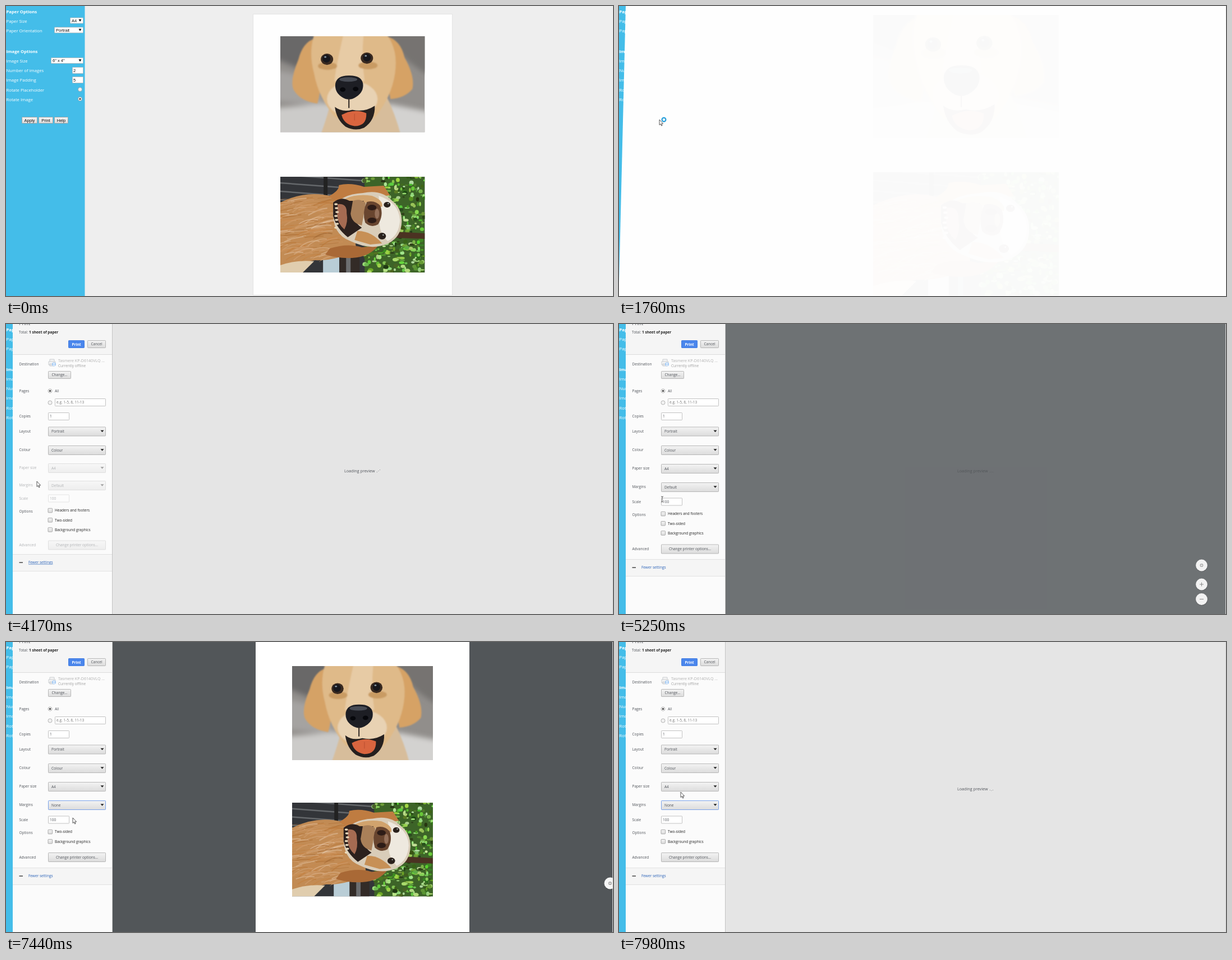
Write an HTML page that moves like this. It is 1082x518 px and loops after 8000 ms.

```html
<!DOCTYPE html>
<html lang="en">
<head>
<meta charset="utf-8">
<title>Print preview</title>
<style>
  html, body { margin: 0; width: 100%; height: 100%; overflow: hidden; background: #eee; }
  svg { display: block; }
  #stage { width: 100vw; height: 100vh; }
  text { white-space: pre; }
  .side { font: 7.7px "Open Sans", "Noto Sans", sans-serif; fill: #fff; }
  .form { font: 7.5px "Liberation Sans", Arial, sans-serif; fill: #111; }
  .ui { font: 6.5px "Open Sans", "Noto Sans", sans-serif; fill: #50545a; }
  .bold { font-weight: 700; }
  .mid { text-anchor: middle; }
</style>
</head>
<body>
<svg id="stage" viewBox="0 0 1082 518" preserveAspectRatio="none">
  <defs>
    <linearGradient id="face" x2="0" y2="1"><stop stop-color="#f3f3f3"/><stop offset="1" stop-color="#dcdcdc"/></linearGradient>
    <filter id="soft"><feGaussianBlur stdDeviation="5"/></filter>
    <filter id="fuzz"><feGaussianBlur stdDeviation="1.3"/></filter>
    <symbol id="puppy" viewBox="0 0 257 171" preserveAspectRatio="none"></symbol>
    <symbol id="retriever" viewBox="0 0 257 171" preserveAspectRatio="none"></symbol>
  </defs>
  <g id="page"></g>
  <g id="sheet">
    <path d="M12 0 0 495V518H1082V56L1081 0Z" fill="#fefefe"/>
    <g opacity=".025">
      <use href="#puppy" x="453" y="16" width="331" height="220"/>
      <use href="#retriever" x="453" y="297" width="331" height="220"/>
    </g>
  </g>
  <g id="dialog">
    <rect x="189" width="892" height="518" fill="#525659"/>
    <g id="paper">
      <rect x="445" width="381" height="518" fill="#fff"/>
      <use href="#puppy" x="510" y="43" width="251" height="168"/>
      <use href="#retriever" x="510" y="287" width="251" height="167.5"/>
    </g>
    <g id="zoom"></g>
    <g id="overlay">
      <rect x="189" width="892" height="518" fill="#e5e5e5"/>
      <g class="ui" style="font-size:7.2px" fill="#444"><text x="603" y="265">Loading preview</text><g id="dots"></g></g>
    </g>
    <rect x="1081" width="1" height="518" fill="#d4d4d4"/>
    <g id="panel"></g>
    <g id="menu"></g>
  </g>
  <g id="cursor" stroke="#222" stroke-width=".75">
    <path id="arrow" d="M0 0V9.5L2.2 7.6 3.7 11 5.1 10.4 3.7 7.1H6.6Z" fill="#fff"/>
    <path id="beam" d="M-2-5Q0-5 0-4Q0-5 2-5M0-4V4M-2 5Q0 5 0 4Q0 5 2 5" fill="none"/>
    <circle id="busy" cx="8" cy="0" r="3.4" fill="#fff" stroke="#2aa0da" stroke-width="2.2"/>
  </g>
</svg>
<script>
const LOOP = 8000;
const $ = id => document.getElementById(id);
const clamp = v => Math.max(0, Math.min(1, v));
const smooth = v => (v = clamp(v), v * v * (3 - 2 * v));
const show = (id, on) => $(id).style.display = on ? '' : 'none';

let seed = 7;
const rnd = (a, b) => a + (b - a) * ((seed = seed * 16807 % 2147483647) / 2147483647);
const many = (n, make) => Array.from({ length: n }, (_, i) => make(i)).join('');

// Markup helpers
const text = (x, y, s, attrs = '') => `<text x="${x}" y="${y}" ${attrs}>${s}</text>`;
const rect = (x, y, w, h, fill, attrs = '') => `<rect x="${x}" y="${y}" width="${w}" height="${h}" fill="${fill}" ${attrs}/>`;
const path = (d, fill, attrs = '') => `<path d="${d}" fill="${fill}" ${attrs}/>`;
const oval = (x, y, rx, ry, fill, attrs = '') => `<ellipse cx="${x}" cy="${y}" rx="${rx}" ry="${ry}" fill="${fill}" ${attrs}/>`;
const box = (x, y, w, h, fill = '#fff', line = '#b4b4b4') =>
  rect(x + .5, y + .5, w - 1, h - 1, fill, `stroke="${line}" stroke-width=".8" rx=".8"`);
const radio = (x, y, on) => oval(x, y, 3.5, 3.5, '#f2f2f2', 'stroke="#999" stroke-width=".7"') + (on ? oval(x, y, 1.6, 1.6, '#333') : '');

function drawPuppy() {
  return rect(0, 0, 257, 171, '#918e8b') + `<g filter="url(#soft)">` +
    path('M-9-9H70L40 60-9 40Z', '#696867') + path('M185-9H266V70Q225 50 185 0Z', '#767371') +
    path('M-9 60 60 75 80 125-9 115Z', '#a5a3a1') + path('M-9 128 100 118 110 180H-9Z', '#cccbc9') +
    path('M190 120 266 135V180H190Z', '#d3d2d0') + '</g><g filter="url(#fuzz)">' +
    path('M72 175Q88 130 92 105H188Q205 140 214 175Z', '#d7bd9b') +
    path('M62 4Q40 10 32 42 16 80 24 96 36 116 66 120 80 70 62 4Z', '#d5a266') +
    path('M188 0Q214 6 221 38 240 72 235 94 222 110 196 112 184 60 188 0Z', '#d6a265') +
    path('M60-2Q50 30 60 66 68 110 98 145H168Q198 108 204 66 210 25 190-2Z', '#dfba89') +
    path('M112-2Q100 50 96 80H150Q144 40 148-2Z', '#e7cba5') +
    oval(128, 112, 45, 32, '#e8d2b3') + oval(84, 53, 17, 7, '#c99b63') + oval(156, 52, 17, 7, '#c99b63') + '</g>' +
    oval(83, 41, 11, 10, '#3a2a20') + oval(154, 39, 11, 10, '#3a2a20') +
    oval(82, 40, 7, 7, '#17171c') + oval(154, 38, 7, 7, '#17171c') +
    oval(80, 37, 2, 1.5, '#8998a4') + oval(152, 35, 2, 1.5, '#8998a4') +
    path('M97 126Q110 136 128 131 150 136 168 124 169 150 149 163 133 170 116 161 100 149 97 126Z', '#25201f') +
    path('M109 140Q132 128 153 137 154 160 132 160 113 157 109 140Z', '#d9653f') + path('M132 138V150', 'none', 'stroke="#b94d32"') +
    path('M98 84Q101 70 121 70 144 69 147 84 149 99 135 108 122 117 109 108 96 99 98 84Z', '#1d1e24') +
    oval(121, 77, 16, 4, '#484c55') + path('M122 110V128', 'none', 'stroke="#2a2420" stroke-width="2"') +
    oval(111, 95, 5, 4, '#07080c') + oval(134, 94, 5, 4, '#07080c');
}

function drawRetriever() {
  const leaf = () => oval(rnd(148, 257).toFixed(1), rnd(0, 171).toFixed(1), rnd(1.5, 5).toFixed(1), rnd(1, 4).toFixed(1),
    `hsl(${rnd(82, 108).toFixed()} ${rnd(40, 65).toFixed()}% ${rnd(14, 76).toFixed()}%)`);
  const hair = () => {
    const x = rnd(12, 112), y = rnd(36, 142);
    return path(`M${x} ${y}q-16 ${rnd(-5, 3)}-34 ${rnd(2, 13)}`, 'none',
      `stroke="hsl(29 53% ${rnd(40, 78).toFixed()}%)" stroke-width="${rnd(.8, 2.4).toFixed(1)}" opacity=".6"`);
  };
  return rect(0, 0, 257, 171, '#333539') +
    many(5, i => path(`M0 ${i * 15 - 4}L160 ${i * 15 + 8}`, 'none', 'stroke="#65686b" stroke-width="2.5"')) +
    rect(77, 0, 7, 35, '#222') + rect(150, 0, 107, 171, '#3d6428') + many(380, leaf) +
    rect(76, 138, 29, 33, '#b9cdd6') + rect(105, 135, 36, 36, '#332b27') + rect(117, 135, 8, 36, '#6d6e70') +
    path('M202 98 257 101V111L202 109Z', '#4b3222') +
    path('M0 46Q45 23 92 35L125 38 135 130Q100 151 62 149 35 154 0 171Z', '#c28b54') + many(150, hair) +
    path('M0 158Q28 148 60 151L40 171H0Z', '#e0cdae') +
    path('M86 35Q106 24 104 15 125 10 149 18L184 16 195 33 160 38 105 47Z', '#bf7c41') +
    path('M88 128Q120 118 145 126L174 123Q159 143 128 145 101 146 80 139Z', '#a96936') +
    path('M94 57Q106 31 147 29 180 22 199 43 216 56 216 80 215 108 192 119 162 133 125 115 91 103 94 57Z', '#d9cdb9') +
    path('M175 34Q211 46 213 78 211 105 191 115 171 95 178 66Z', '#eee9df') +
    path('M116 39Q136 30 163 34 184 42 181 54L147 45 112 49Z', '#d1a36d') +
    path('M137 97Q161 96 181 119L160 121 132 113Z', '#c79056') +
    path('M94 46Q108 34 123 43L149 43Q133 53 132 67 130 81 145 91L120 108Q99 91 94 70Z', '#2c211e') +
    path('M102 49Q119 47 118 65 121 81 114 94 102 84 101 68Z', '#a56b52') +
    many(7, i => oval(99 + i % 3, 49 + i * 7, 3, 1.8, '#e8d9bb')) +
    path('M129 43Q142 38 152 47L145 87Q127 83 125 66Z', '#a98059') +
    path('M154 45Q168 41 178 52 184 69 174 85 162 92 151 82 145 63 154 45Z', '#68452f') +
    oval(163, 55, 8, 5, '#2d1c17') + oval(163, 78, 8, 5, '#2d1c17') + oval(172, 66, 4, 9, '#94705a') +
    oval(190, 50, 6, 5, '#2a211c') + oval(181, 106, 7, 6, '#2a211c') +
    oval(192, 48, 1.2, 1, '#bcc') + oval(183, 104, 1.2, 1, '#bcc');
}

function drawPage() {
  const select = (x, y, s) => box(x, y, 138 - x, 11) + text(x + 3, y + 8, s) + path(`M129.5 ${y + 3.2}h5l-2.5 4.4z`, '#111');
  const number = (y, s) => box(118, y, 20, 12) + text(120, y + 8.8, s);
  const button = (x, w, s, id = '') => `<g id="${id}">` + box(x, 198, w, 12, 'url(#face)', '#999') + '</g>' + text(x + w / 2, 206.7, s, 'class="mid"');
  const rows = { 'Paper Size': 27, 'Paper Orientation': 44, 'Image Size': 98, 'Number of images': 115, 'Image Padding': 132, 'Rotate Placeholder': 150, 'Rotate Image': 167 };
  return rect(0, 0, 1082, 518, '#eee') + rect(440.5, 14.5, 355, 502, '#fefefe', 'stroke="#e4e4e4"') +
    '<use href="#puppy" x="489" y="54" width="257.5" height="171.5"/><use href="#retriever" x="489" y="305" width="257.5" height="171"/>' +
    rect(0, 0, 140.5, 518, '#44bde9') + '<g class="side">' +
    text(.5, 12.7, 'Paper Options', 'class="bold"') + text(.5, 83.9, 'Image Options', 'class="bold"') +
    Object.entries(rows).map(([s, y]) => text(.5, y + 2.8, s)).join('') + '</g><g class="form">' +
    select(114, 20.5, 'A4') + select(86, 37.5, 'Portrait') + select(80, 92, '6" x 4"') + number(109, 2) + number(126, 5) +
    radio(132, 149, false) + radio(132, 166, true) +
    button(28, 28, 'Apply') + button(58, 26, 'Print', 'printButton') + button(86, 25, 'Help') + '</g>';
}

const button = (x, y, w, h, s) => box(x, y, w, h, 'url(#face)', '#a9a9a9') + text(x + w / 2, y + h / 2 + 2.3, s, 'class="mid"');
const label = (y, s) => text(23.5, y + 2.4, s);
const select = (y, s, line = '#a9a9a9') => box(75, y - 8, 103, 17, 'url(#face)', line) + text(81, y + 2.5, s) + path(`M168.5 ${y - 1.8}h6l-3 3.6z`, '#222');
const input = (x, y, w, s, fill = '#50545a') => box(x, y - 7, w, 14) + text(x + 3, y + 2.4, s, `style="fill:${fill}"`);
const check = (y, s) => box(74.5, y - 4.2, 8.5, 8.5, 'url(#face)', '#9a9a9a') + text(87, y + 2.4, s, 'style="fill:#222"');

// stage: 0 waiting, 1 short list, 2 expanding, 3 full list
function drawPanel(stage, ready, none, focus, underline) {
  const full = stage > 1, d = stage === 2 ? 1 : 0;
  const foot = !full ? 244 : none ? 403 : 420 - 9 * d;
  const options = none ? ['Two-sided', 'Background graphics'] : ['Headers and footers', 'Two-sided', 'Background graphics'];
  const advanced = none ? 384.5 : 402 - 7 * d;
  let out = rect(12, 0, 177, 518, '#fbfbfb') + rect(12, 0, 177, 54, '#f5f5f5') + rect(12, 54, 177, 1, '#dcdcdc') +
    rect(189, 0, 1, 518, '#c4c4c4') + text(23, 2, 'Print', 'style="font-size:9px"') +
    (stage ? text(23, 17.3, 'Total: <tspan class="bold" fill="#222">1 sheet of paper</tspan>') : text(23, 17.3, 'Loading...')) +
    (ready ? box(111, 29, 29, 14, '#4a86ec', '#3070dd') : box(111, 29, 29, 14, '#eee', '#ccc')) +
    text(125.5, 38.6, 'Print', `class="mid bold" style="fill:${ready ? '#fff' : '#aaa'}"`) + button(145, 29, 33, 14, 'Cancel');
  if (!stage) return out;
  out += label(72, 'Destination') +
    path('M78 67V63H86V67M76 67H88V73H76ZM78 71H86V75H78Z', '#f4f4f4', 'stroke="#c6c9cc" stroke-width=".9"') +
    oval(85.5, 72, 3.6, 3.6, '#a9cdf5') + oval(85.5, 71, 1.2, 1.2, '#fff') + path('M83 74.5Q85.5 71.5 88 74.5Z', '#fff') +
    text(93, 67.5, 'Tasmere KP-D6140VLQ ...', 'style="fill:#b0b0b0;font-size:7.1px"') + text(93, 76.6, 'Currently offline', 'style="fill:#a0a0a0"') +
    button(75, 84, 41, 14, 'Change...') +
    label(119.5, 'Pages') + radio(78.5, 119.5, true) + text(87, 122, 'All') +
    radio(78.5, 140.5, false) + input(87, 140, 91, 'e.g. 1-5, 8, 11-13', '#777') +
    label(165, 'Copies') + input(75, 165, 38, '1') + label(192, 'Layout') + select(191.5, 'Portrait') +
    label(225, 'Colour') + select(225, 'Colour');
  if (full) {
    out += `<g opacity="${d ? .42 : 1}">` + label(258 - d, 'Paper size') + select(258 - d, 'A4') +
      label(291 - 3.5 * d, 'Margins') + select(291 - 3 * d, none ? 'None' : 'Default', focus) +
      label(317.5 - 6 * d, 'Scale') + input(75, 317.5 - 6 * d, 38, '100') +
      label(advanced, 'Advanced') + button(75, advanced - 8.5, 103, 17, 'Change printer options...') + '</g>' +
      label(340.5 - 6 * d, 'Options') + options.map((s, i) => check(339 + 17.2 * i - 6 * d, s)).join('');
  }
  return out + rect(12, foot, 177, 30, '#f5f5f5') + rect(12, foot, 177, 1, '#e2e2e2') + rect(12, foot + 30, 177, 1, '#e2e2e2') +
    rect(23.5, foot + 14.3, 6.5, 1.5, '#444') + (full ? '' : rect(26, foot + 11.8, 1.5, 6.5, '#444')) +
    text(40, foot + 16.8, full ? 'Fewer settings' : 'More settings', `style="fill:#2a62b8" ${underline ? 'text-decoration="underline"' : ''}`);
}

function drawMenu(active) {
  return box(75, 299, 103, 44, '#fff', '#8a8a8a') + ['Default', 'None', 'Minimum', 'Custom'].map((s, i) =>
    (i === active ? rect(76, 300 + i * 10.5, 101, 10.5, '#1e90ff') : '') +
    text(81, 307.6 + i * 10.5, s, `style="fill:${i === active ? '#fff' : '#222'}"`)).join('');
}

const ZOOM = [[431, 'M-3-1H-1V-3M1-3V-1H3M3 1H1V3M-1 3V1H-3'], [465, 'M-3.5 0H3.5M0-3.5V3.5'], [491.5, 'M-3.5 0H3.5']];
$('puppy').innerHTML = drawPuppy();
$('retriever').innerHTML = drawRetriever();
$('page').innerHTML = drawPage();
$('panel').setAttribute('class', 'ui');
$('menu').setAttribute('class', 'ui');
$('zoom').innerHTML = ZOOM.map(([, icon]) => '<g>' + oval(.3, .8, 10.7, 10.7, '#0003') + oval(0, 0, 10.4, 10.4, '#f5f5f5') +
  path(icon, 'none', 'stroke="#666" stroke-width=".9"') + '</g>').join('');
$('dots').innerHTML = many(3, i => text(660.3 + i * 2.6, 265, '.'));

// The screen refreshes in bursts: [first, last, steps]
const BURSTS = [[100, 860, 8], [980, 1080, 2], [1530, 1970, 5], [2110, 2860, 8], [2950, 3710, 8], [3840, 4620, 8],
  [4730, 5460, 8], [5570, 6020, 5], [6220, 6560, 4], [7000, 7000, 1], [7210, 7980, 8]];
function lastRefresh(time) {
  const t = time + 13;
  const burst = BURSTS.filter(b => b[0] <= t).pop();
  if (!burst) return 0;
  const [first, last, steps] = burst, gap = (last - first) / (steps - 1) || 1;
  return Math.min(last, first + Math.floor((t - first) / gap) * gap);
}

// Piecewise linear track of [position, ...values]
function track(points, at) {
  const i = points.findIndex(p => p[0] > at);
  if (i < 0) return points[points.length - 1].slice(1);
  if (!i) return points[0].slice(1);
  const a = points[i - 1], b = points[i], k = (at - a[0]) / (b[0] - a[0]);
  return a.slice(1).map((v, j) => v + (b[j + 1] - v) * k);
}
const POINTER = [[100, 988, 505], [430, 480, 310], [860, 83, 199], [1080, 72, 203], [2110, 72, 203], [2540, 84, 286], [2860, 92, 230],
  [3200, 80, 190], [3710, 56, 268], [3840, 55, 270], [4174, 55, 281], [4620, 59, 291], [5250, 77, 313], [5460, 77, 313],
  [5682, 124, 294], [6220, 124, 297], [6560, 119, 314], [7430, 119, 314], [7980, 110, 268]];
const JUMP = [[0, 0], [.55, 0], [.6, -5.6], [.8, 1.7], [.9, -1.1], [.95, .6], [1, 0]];

let panelKey, menuKey;
function render(t) {
  show('sheet', t >= 1530 && t < 1860);
  $('sheet').setAttribute('opacity', t < 1600 ? .55 : t < 1700 ? .88 : 1);
  $('printButton').style.filter = t >= 980 ? 'brightness(.96)' : '';
  show('dialog', t >= 1860);

  const stage = t < 2110 ? 0 : t < 3900 ? 1 : t < 4250 ? 2 : 3;
  const none = t >= 7000;
  const focus = none ? '#5b8de8' : t >= 5600 ? '#777' : '#a9a9a9';
  const args = [stage, t >= 3840, none, focus, t > 3500 && t < 4250];
  if (panelKey !== (panelKey = args.join())) $('panel').innerHTML = drawPanel(...args);

  show('menu', t >= 5750 && t < 7000);
  const active = t >= 6400 ? 1 : 0;
  if (menuKey !== (menuKey = active)) $('menu').innerHTML = drawMenu(active);

  show('paper', t >= 5565);
  const fade = t < 6000 ? 1 - smooth((t - 5070) / 252) : smooth((t - 7480) / 220);
  $('overlay').setAttribute('opacity', fade);
  [...$('zoom').children].forEach((g, i) => {
    const leave = 56 * smooth((t - (i ? 7215 : 7302)) / 205);
    g.setAttribute('transform', `translate(${1038.5 + leave} ${ZOOM[i][0]})`);
  });
  [...$('dots').children].forEach((dot, i) => {
    const phase = ((t - 1006 - i * 100) / 1800 + 1) % 1;
    dot.setAttribute('y', 265 + track(JUMP, phase)[0]);
  });

  const [x, y] = track(POINTER, t);
  const beam = t > 5200 && t < 5565;
  show('cursor', t >= 100);
  show('arrow', !beam);
  show('beam', beam);
  show('busy', t >= 1530 && t < 1960);
  $('cursor').setAttribute('transform', `translate(${x} ${y})`);
}

const start = performance.now();
function tick() {
  render(lastRefresh((performance.now() - start) % LOOP));
  requestAnimationFrame(tick);
}
tick();
</script>
</body>
</html>
```
